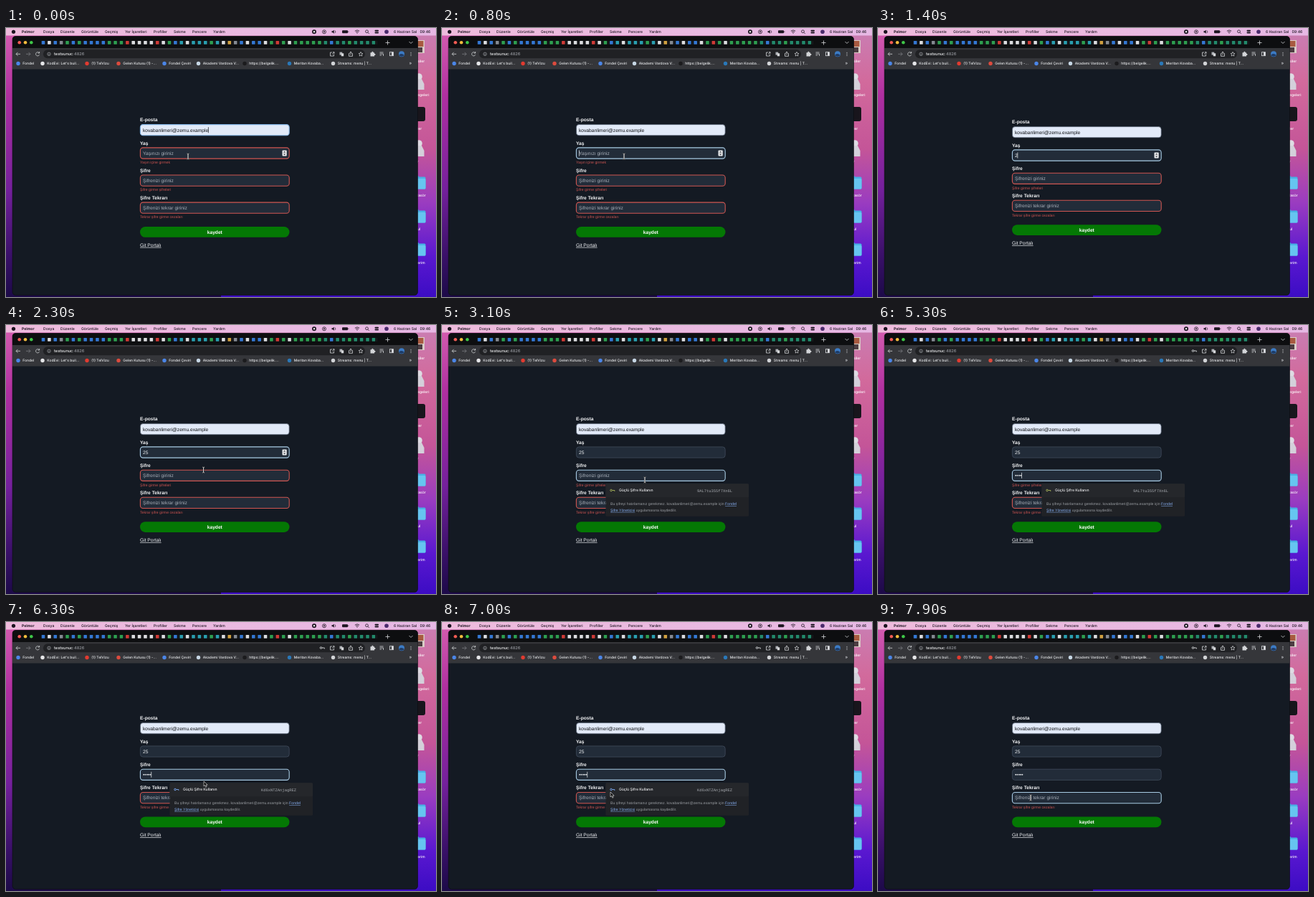
Recreate the animation shown at these times as an HTML page. Size 600x375 px, loop 8 s.

```html
<!DOCTYPE html>
<html lang="tr">
<head>
<meta charset="utf-8">
<style>
html, body { margin: 0; width: 100%; height: 100%; overflow: hidden; background: #141a23; }
svg { display: block; width: 100vw; height: 100vh; }
text { font-family: "Liberation Sans", Arial, sans-serif; white-space: pre; text-rendering: geometricPrecision; }
.ui { font-family: Inter, "Noto Sans", sans-serif; font-weight: 500; }
.mono { font-family: "Liberation Mono", monospace; }
</style>
</head>
<body>
<svg viewBox="0 0 600 375" preserveAspectRatio="none">
  <defs>
    <linearGradient id="left" x2="0" y2="1">
      <stop stop-color="#d65fb0"/><stop offset=".25" stop-color="#b02fa0"/>
      <stop offset=".6" stop-color="#74209c"/><stop offset=".85" stop-color="#391068"/>
      <stop offset="1" stop-color="#1c0a48"/>
    </linearGradient>
    <linearGradient id="right" x2="0" y2="1">
      <stop stop-color="#c97fb4"/><stop offset=".2" stop-color="#d26a9c"/>
      <stop offset=".45" stop-color="#c45598"/><stop offset=".65" stop-color="#9a3cc0"/>
      <stop offset=".85" stop-color="#5a18d0"/><stop offset="1" stop-color="#3c0cc4"/>
    </linearGradient>
    <linearGradient id="menu"><stop stop-color="#eebbdc"/><stop offset="1" stop-color="#e6b8e4"/></linearGradient>
  </defs>
  <g id="desktop"></g>
  <g id="browser"></g>
  <g id="form"></g>
</svg>
<script>
const $ = id => document.getElementById(id);
const rect = (x, y, w, h, fill, more = '') =>
  `<rect x="${x}" y="${y}" width="${w}" height="${h}" fill="${fill}" ${more}/>`;
const dot = (x, y, r, fill, more = '') => `<circle cx="${x}" cy="${y}" r="${r}" fill="${fill}" ${more}/>`;
const line = (d, stroke = '#d4d6d9', w = .8) =>
  `<path d="${d}" fill="none" stroke="${stroke}" stroke-width="${w}"/>`;
// y is the optical middle of the line of text
const text = (x, y, s, size, fill, more = '') =>
  `<text x="${x}" y="${y + size * .35}" font-size="${size}" fill="${fill}" ${more}>${s}</text>`;
const ui = (x, y, s, size, fill, more = '') => text(x, y, s, size, fill, 'class="ui" ' + more);

function drawDesktop() {
  const ink = '#1c1420';
  let s = rect(0, 0, 300, 375, 'url(#left)') + rect(300, 0, 300, 375, 'url(#right)') +
    rect(0, 0, 600, 10.5, 'url(#menu)') + dot(10.5, 5.3, 2.6, ink);
  const menus = [['Pelmor', 22], ['Dosya', 52], ['Düzenle', 76], ['Görüntüle', 105], ['Geçmiş', 138],
    ['Yer İşaretleri', 166], ['Profiller', 206], ['Sekme', 234], ['Pencere', 260], ['Yardım', 289]];
  menus.forEach(([m, x], i) => s += ui(x, 5.2, m, 5.1, ink, i ? '' : 'style="font-weight:700"'));
  s += dot(430, 5.3, 3, ink) + dot(430, 5.3, 1.2, '#eee') +
    dot(444, 5.3, 2.5, 'none', `stroke="${ink}" stroke-width=".8"`) + dot(444, 5.3, 1, ink) +
    `<path d="M454.500 4.300h1.400l1.800-1.500v5l-1.800-1.500h-1.400z" fill="${ink}"/>` + line('M459 3.500q1.600 1.800 0 3.600', ink, .7) +
    rect(469, 3.3, 8, 4, ink, 'rx="1"') + rect(477.5, 4.5, .7, 1.6, ink) +
    line('M486.800 4.200q3.200-2.600 6.400 0M488 5.700q2-1.500 4 0', ink) + dot(490, 7.1, .7, ink) +
    dot(503.5, 4.8, 1.9, 'none', `stroke="${ink}" stroke-width=".8"`) + line('M505 6.300l1.800 1.800', ink) +
    rect(514.5, 2.7, 5.5, 2, ink, 'rx="1"') + rect(514.5, 5.6, 5.5, 2, ink, 'rx="1"') +
    dot(531, 5.3, 2.8, '#4a2a6c') +
    ui(541, 5.2, '6 Haziran Sal', 5.1, ink) + ui(577.5, 5.2, '09:46', 5.2, ink);

  s += rect(568, 17, 16, 18, '#d9cdc6') + rect(568, 18, 14.5, 8, '#a85a40') + rect(568, 27, 13, 7, '#4d3d42');
  for (const y of [62, 155])
    s += dot(576, y + 6, 4.8, '#dedbe3') + `<path d="M570 ${y + 9}h10l3.500 7v8h-13.500z" fill="#d4d0da"/>`;
  s += rect(566, 110, 19, 20, '#18151c', 'rx="3"');
  for (const y of [206, 253, 299])
    s += rect(566, y, 10, 4, '#3fa5dc', 'rx="1"') + rect(566, y + 1.5, 19.5, 17, '#49b2e6', 'rx="1.5"') +
      rect(566, y + 4, 19.5, 14.5, '#66c5f0', 'rx="1.5"');
  const names = [['siler', 46], ['egeleri', 93], ['ler', 140], ['r', 186], ['lasör', 233], ['ul', 280], ['erim', 327]];
  for (const [n, y] of names) s += ui(574, y, n, 5, '#fff');
  $('desktop').innerHTML = s;
}

function drawBrowser() {
  let s = rect(9, 11.5, 565.5, 361, '#141a23', 'rx="4.5" stroke="#0b0b10" stroke-width=".6"') +
    '<path d="M9 29V16q0-4.500 4.500-4.500H570q4.500 0 4.500 4.500V29z" fill="#0d0e10"/>' +
    rect(9, 28, 565.5, 29.5, '#35363a');
  ['#f25c54', '#f5bd3d', '#3fc748'].forEach((c, i) => s += dot(18.7 + i * 8.3, 20.3, 2.3, c));

  const hues = { b: '#3478d4', w: '#dcdde0', g: '#858a92', n: '#2e9e50', r: '#cf3a36', t: '#2a9fb0', y: '#d0a040', s: '#238a6c' };
  const tabs = 'bwbgnbnbbbbnnnrwwwwrwnbtwtttntwygbwbbwnrnwnnnnnsbssnssss';
  [...tabs].forEach((c, i) => {
    const x = 52 + i * 8.38;
    s += rect(x - 2.3, 18, 4.6, 4.8, hues[c], 'rx=".6"') + rect(x + 4, 18, .4, 5, '#3c3e42');
  });
  s += line('M529.500 20.500h6M532.500 17.500v6') + line('M562.500 19l2.500 2.500 2.500-2.500');

  // toolbar
  s += rect(52, 30.3, 449, 12, '#202124', 'rx="6"') +
    line('M20 36.300h-6m2.500-2.500l-2.500 2.500 2.500 2.500') + line('M28 36.300h6m-2.500-2.500l2.500 2.500-2.500 2.500', '#7b7d82') +
    line('M46.300 34.800a2.600 2.600 0 1 0 .2 2.600M46.600 33v2h-2') +
    dot(60, 36.3, 2.2, 'none', 'stroke="#a5a8ad" stroke-width=".7"') + rect(59.6, 35.8, .8, 1.8, '#a5a8ad') +
    ui(67, 36.5, 'testsunuc<tspan fill="#989ba1">:4826</tspan>', 5.6, '#f0f1f3') +
    line('M455 34h-2.500v5h5v-2.500M456 33.700h2v2m0-2l-3 3') +
    rect(465.5, 33.6, 3.7, 4, '#aeb1b6') + rect(467.8, 35.3, 3.4, 4, '#d6d8db') +
    line('M479.500 35.500h-1v3.800h5v-3.800h-1M481 37.500v-4.500m-1.500 1.500l1.500-1.500 1.500 1.500') +
    line('M495 33.300l.9 2 2.100.2-1.600 1.400.5 2.200-1.900-1.200-1.900 1.200.5-2.200-1.600-1.400 2.100-.2z', '#d4d6d9', .7) +
    '<path d="M508.500 34.300h2a1 1 0 1 1 1.800 0h1.700v1.700a1 1 0 1 1 0 1.800v1.700h-5.500z" fill="#d4d6d9"/>' +
    line('M521.500 34h5M521.500 36h5M521.500 38h2.500M526.500 36v3') +
    rect(535.5, 33.7, 5, 5, 'none', 'stroke="#d8dade" stroke-width=".8"') + rect(538, 33.7, 2.5, 5, '#d8dade') +
    dot(552, 36.3, 4, '#3c7bc4') + '<path d="M548.300 37.500q3-3 7.300 0a4 4 0 0 1-7.300 0" fill="#1d3a64"/>';
  for (const y of [34.3, 36.3, 38.3]) s += dot(565, y, .6, '#d4d6d9');

  const marks = [['Fondel', 17, '#4b86e8'], ["KodEvi: Let's buil...", 51, '#e6e7e9'], ['(1) TelVizu', 113, '#e23b30'],
    ['Gelen Kutusu (1) -...', 157, '#dd4b3e'], ['Fondel Çeviri', 221, '#4b86e8'], ['Akademi Vardova V...', 268.5, '#c6d6e4'],
    ['https://belgelik....', 333, '#1b1b1d'], ['Meritan Kovaba...', 395.5, '#2a78b8'], ['Streams: menu | T...', 456.5, '#d2d4d7']];
  for (const [name, x, c] of marks) s += dot(x, 49.5, 2.7, c) + ui(x + 6.3, 49.5, name, 4.95, '#eceef0');
  s += ui(562.5, 49.2, '»', 6, '#d4d6d9');
  $('browser').innerHTML = s;
}

// Timeline in ms
const LOOP = 8000;
const FOCUS = [[0, 0], [600, 1], [2500, 2], [7300, 3]];
const AGE = [1200, 1700], PASS = [4100, 4400, 4800, 5200, 5900];
const EVENTS = [...FOCUS.map(f => f[0]), ...AGE, ...PASS];
const MOUSE = [[0, 254, 179], [2000, 254, 179], [2450, 283, 210], [2900, 283, 216], [6000, 283, 216],
  [6300, 276, 222], [6700, 276, 222], [7200, 213, 245], [LOOP, 213, 245]];
const count = (times, t) => times.filter(e => e <= t).length;

function mouseAt(t) {
  const i = MOUSE.findIndex(k => k[0] > t), [t0, x0, y0] = MOUSE[i - 1], [t1, x1, y1] = MOUSE[i];
  const u = (t - t0) / (t1 - t0), e = u * u * (3 - 2 * u);
  return [x0 + (x1 - x0) * e, y0 + (y1 - y0) * e];
}

const EMAIL = 'kovabanlimeri@zemu.example', SIZE = 6.67;

const keyIcon = (x, y, c) =>
  dot(x, y, 1.3, 'none', `stroke="${c}" stroke-width=".9"`) + line(`M${x + 1.3} ${y}h3.500v1.500`, c, .9);
const link = s => `<tspan fill="#86aef0" text-decoration="underline">${s}</tspan>`;

function popup(y, renewed) {
  return rect(228.5, y, 199.5, 45.5, '#202226', 'rx="1.5"') + rect(228.5, y, 199.5, 19, '#25272b', 'rx="1.5"') +
    keyIcon(236, y + 9.3, renewed ? '#7ba7ee' : '#a9b65a') +
    ui(247, y + 9.5, 'Güçlü Şifre Kullanın', 5.1, '#f0f1f3') +
    text(356, y + 9.5, renewed ? 'Kd6xNTZAnjagREZ' : '9AL7tu355f7Xn6L', 5.45, '#a6aaaf', 'class="mono"') +
    text(235, y + 28, `Bu şifreyi hatırlamanız gerekmez. ${EMAIL} için ${link('Fondel')}`, 5.2, '#989ca1') +
    text(235, y + 36.8, link('Şifre Yöneticisi') + ' uygulamasına kaydedilir.', 5.2, '#989ca1');
}

let shown = '';
function render(t) {
  const focus = FOCUS.filter(f => f[0] <= t).pop()[1];
  const age = count(AGE, t), pass = count(PASS, t);
  const last = Math.max(...EVENTS.filter(e => e <= t));
  const caretOn = Math.floor((t - last) / 500) % 2 === 0;
  const [mx, my] = mouseAt(t);
  const fields = [
    { label: 'E-posta', value: EMAIL },
    { label: 'Yaş', hint: 'Yaşınızı giriniz', value: '25'.slice(0, age), error: age ? '' : 'Yaşın içine girmek' },
    { label: 'Şifre', hint: 'Şifrenizi giriniz', value: '•'.repeat(pass), error: pass > 4 ? '' : 'Şifre girme şifreleri' },
    { label: 'Şifre Tekrarı', hint: 'Şifrenizi tekrar giriniz', value: '', error: 'Tekrar şifre girme cezaları' }
  ];
  const errors = fields.filter(f => f.error).length;
  let y = 128 + 3 * (3 - errors), s = '', popY = 0, beam = false;

  fields.forEach((f, i) => {
    const top = y + 6.2, mid = y + 14.2, on = i === focus;
    const over = mx > 187 && mx < 395 && my > top && my < top + 16;
    beam ||= over;
    const border = on ? (i ? '#a8cbe4' : '#7fb0e0') : f.error ? '#cf5651' : '#465162';
    s += text(187, y, f.label, SIZE, '#f4f5f7', 'font-weight="700"') +
      rect(187.4, top + .4, 207.8, 15.2, i ? '#222c39' : '#e2eaf8',
        `rx="3.800" stroke="${border}" stroke-width="${on || f.error ? 1.1 : .7}"`) +
      text(191, mid, f.value || f.hint, SIZE, !i ? '#0c0e12' : f.value ? '#f0f2f5' : '#a9b0ba', on && f.value ? 'id="value"' : '');
    if (on && caretOn) s += rect(191, mid - 4, .7, 8, i ? '#f0f2f5' : '#0c0e12', 'id="caret"');
    if (i === 1 && (on || over))
      s += rect(385.5, mid - 4, 6.2, 8, '#e8e9eb', 'rx="1"') +
        `<path d="M387 ${mid - .9}l1.600-1.800 1.600 1.800zM387 ${mid + .9}l1.600 1.800 1.600-1.800z" fill="#33373d"/>`;
    if (f.error) s += text(187, y + 27.1, f.error, 5.2, '#c95350');
    if (i === 2 && on) popY = top + 19.4;
    y += f.error ? 38.1 : 32.3;
  });

  y += 9.8;
  s += rect(187, y - 7.4, 208.5, 14.8, '#047804', 'rx="7.400"') +
    text(291.3, y, 'kaydet', SIZE, '#fff', 'font-weight="700" text-anchor="middle"') +
    text(187, y + 18, 'Git Portalı', SIZE, '#f0f2f5', 'text-decoration="underline"');
  if (pass) s += keyIcon(439.5, 36, '#d4d6d9');
  if (popY) {
    s += popup(popY, pass > 4);
    if (mx > 228 && my > popY) beam = false;
  }

  const typing = t >= AGE[0] && t < 2000 || t >= PASS[0] && t < 6000;
  if (!typing) {
    const bar = 'M-1.500-4q1.500 0 1.500 1v6q0 1-1.500 1M1.500-4q-1.500 0-1.500 1v6q0 1 1.500 1';
    const pointer = beam
      ? line(bar, '#111', 1.5) + line(bar, '#e8e8e8', .7)
      : '<path d="M0 0v7l1.600-1.500 1.200 2.700 1.300-.6-1.200-2.500h2.300z" fill="#111" stroke="#eee" stroke-width=".6"/>';
    s += `<g transform="translate(${mx} ${my})">${pointer}</g>`;
  }

  if (s === shown) return;
  $('form').innerHTML = shown = s;
  const value = $('value'), caret = $('caret');
  if (value && caret) caret.setAttribute('x', 190.8 + value.getComputedTextLength());
}

drawDesktop();
drawBrowser();
const start = performance.now();
(function tick() {
  render((performance.now() - start) % LOOP);
  requestAnimationFrame(tick);
})();
</script>
</body>
</html>
```
